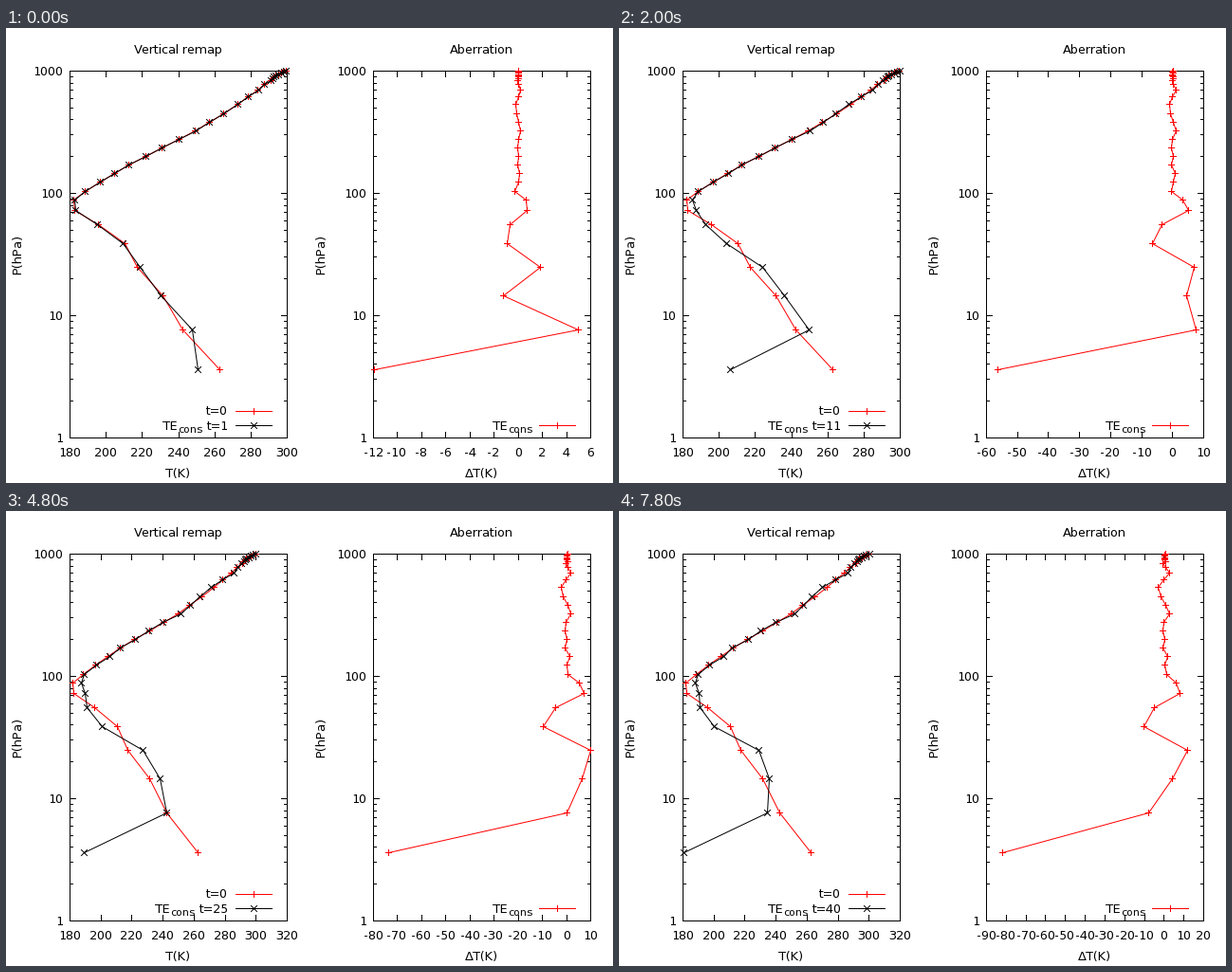
A matplotlib script that plays this animation: 640x480 px, repeating every 8000 ms.

```python
import math

import matplotlib.pyplot as plt
import numpy as np
from matplotlib.animation import FuncAnimation

plt.rcParams.update({
    "font.family": "DejaVu Sans",
    "text.hinting": "force_autohint",
    "text.hinting_factor": 1,       # whole-pixel letter spacing
    "path.snap": False,
    "path.simplify": False,
})

STEPS, INTERVAL = 40, 200
PX = 0.72                           # one pixel in points at 100 dpi
FONT, SUB = 13.33 * PX, 10.67 * PX
TOP, BOTTOM, WIDTH = 45, 432, 229
LEFT_X, RIGHT_X = 67, 387
RED, BLACK = "#ff0000", "#000000"
COUNT = 30

# Heights of the levels: gaps shrink aloft, stay even, then shrink to the ground
i = np.arange(COUNT - 1)
gaps = np.where(i < 7, 41.5 - 5.9 * i + 0.135 * i ** 2,
                np.clip(8.5 - 1.47 * (i - 18), 1.3, 9.12))
LEVEL_Y = np.round(359.6 - np.append(0, np.cumsum(gaps))) + 0.5

# Starting temperature (K), straight between a few levels
START = np.interp(
    np.arange(COUNT),
    [0, 1, 2, 3, 4, 5, 6, 7, 8, 11, 15, 18, 20, 22, 25, 29],
    [262.6, 242.4, 231.5, 217.1, 210.5, 195.8, 182.4, 182.0, 188.6,
     212.7, 249.4, 272.9, 283.9, 291.0, 293.8, 299.62])

# Drift of the top levels at four key steps; final drift of those below
KEY_LOG = np.log1p([1, 8, 20, 40])
HIGH = np.array([
    (-11.9, -48.95, -69.2, -81.8),
    (5.0, 8.7, 2.8, -7.7),
    (-1.2, 3.2, 6.5, 4.3),
    (1.87, 6.1, 9.0, 11.9),
    (-0.9, -5.3, -9.1, -10.3),
    (-0.68, -3.0, -4.3, -5.0),
    (0.75, 4.2, 6.7, 8.0),
    (0.66, 2.7, 4.75, 6.1),
    (-0.28, -0.45, 0.2, 1.1),
])
LOW = np.array([0.4, 1.8, -0.8, 0.2, -0.7, -0.1, 2.7, 0.7, -1.8, -2.9, -0.2,
                2.6, 0.7, -0.5, 0.7, 0.5, 0.1, 0.1, 0.2, 0.1, 0.7])
CURVES = np.polyfit(KEY_LOG, (HIGH / KEY_LOG).T, 3)


def drift(t):
    """Temperature change on every level after t steps."""
    log = math.log1p(t)
    high = log * sum(c * log ** (3 - k) for k, c in enumerate(CURVES))
    return np.append(high, LOW * (t / STEPS) ** 0.75)


def auto_range(values):
    """Axis limits and tick step that enclose the values."""
    lo, hi = min(values), max(values)
    power = 10 ** math.floor(math.log10(hi - lo))
    count = 20 * power / (hi - lo)
    steps = ((10, 0.2), (4, 0.5), (2, 1), (0, 2))
    unit = next(u for limit, u in steps if count > limit)
    step = round(unit * power)
    return math.floor(lo / step) * step, math.ceil(hi / step) * step, step


def to_y(p):
    return round(BOTTOM - (BOTTOM - TOP) * math.log10(p) / 3) + 0.5


def to_x(v, x0, lo, hi):
    return np.round(x0 + WIDTH * (np.asarray(v) - lo) / (hi - lo)) + 0.5


fig = plt.figure(figsize=(6.4, 4.8), dpi=100, facecolor="white")
ax = fig.add_axes([0, 0, 1, 1])


def stroke(xs, ys, color):
    ax.plot(xs, ys, color=color, lw=PX, solid_capstyle="projecting",
            solid_joinstyle="round")


def segments(parts, color=BLACK):
    xs, ys = [], []
    for x1, y1, x2, y2 in parts:
        xs += [x1, x2, np.nan]
        ys += [y1, y2, np.nan]
    stroke(xs, ys, color)


def text(x, y, s, ha="center", size=FONT):
    ax.text(x, y, s, ha=ha, va="baseline", fontsize=size, color=BLACK)


def markers(xs, ys, kind, color):
    parts = []
    for x, y in zip(xs, ys):
        if kind == "+":
            parts += [(x - 3, y, x + 3, y), (x, y - 3, x, y + 3)]
        else:
            parts += [(x - 3, y - 3, x + 3, y + 3),
                      (x - 3, y + 3, x + 3, y - 3)]
    segments(parts, color)


def curve(xs, kind, color):
    stroke(xs, LEVEL_Y, color)
    markers(xs, LEVEL_Y, kind, color)


def key(x, y, kind, color):
    segments([(x, y, x + 38, y)], color)
    markers([x + 19], [y], kind, color)


def cons_label(x, tail=""):
    text(x, 424, "TE", "left")
    text(x + 16, 427, "cons", "left", SUB)
    text(x + 46, 424, tail, "left")


def panel(x0, title, label, lo, hi, step):
    a, b = x0 + 0.5, x0 + WIDTH + 0.5
    top, base = TOP + 0.5, BOTTOM + 0.5
    parts = [(a, top, b, top), (a, base, b, base),
             (a, top, a, base), (b, top, b, base)]
    for d in range(4):
        for m in range(1, 10 if d < 3 else 2):
            y = to_y(m * 10 ** d)
            size = 6 if m == 1 else 3
            parts += [(a, y, a + size, y), (b - size, y, b, y)]
        text(x0 - 7, to_y(10 ** d) + 4.5, str(10 ** d), "right")
    for v in range(lo, hi + 1, step):
        x = float(to_x(v, x0, lo, hi))
        parts += [(x, base - 6, x, base), (x, top, x, top + 6)]
        text(x - 0.5, 452, str(v))
    segments(parts)
    mid = x0 + WIDTH / 2
    text(mid, 27, title)
    text(mid, 474, label)
    ax.text(x0 - 54.5, 239, "P(hPa)", rotation=90, ha="center", va="center",
            fontsize=FONT, color=BLACK)


def draw(n):
    t = n + 1
    ax.clear()
    ax.set_xlim(0, 640)
    ax.set_ylim(480, 0)
    ax.axis("off")

    diff = drift(t)
    now = START + diff

    lo, hi, step = auto_range(np.append(START, now))
    panel(LEFT_X, "Vertical remap", "T(K)", lo, hi, step)
    text(210, 408, "t=0", "left")
    key(242.5, 404.5, "+", RED)
    curve(to_x(START, LEFT_X, lo, hi), "+", RED)
    cons_label(165 - 8 * (len(str(t)) - 1), f"t={t}")
    key(242.5, 419.5, "x", BLACK)
    curve(to_x(now, LEFT_X, lo, hi), "x", BLACK)

    lo, hi, step = auto_range(diff)
    panel(RIGHT_X, "Aberration", "ΔT(K)", lo, hi, step)
    cons_label(513)
    key(562.5, 419.5, "+", RED)
    curve(to_x(diff, RIGHT_X, lo, hi), "+", RED)
    return []


anim = FuncAnimation(fig, draw, frames=STEPS, interval=INTERVAL,
                     repeat=True, repeat_delay=0, blit=False)
plt.show()
```
